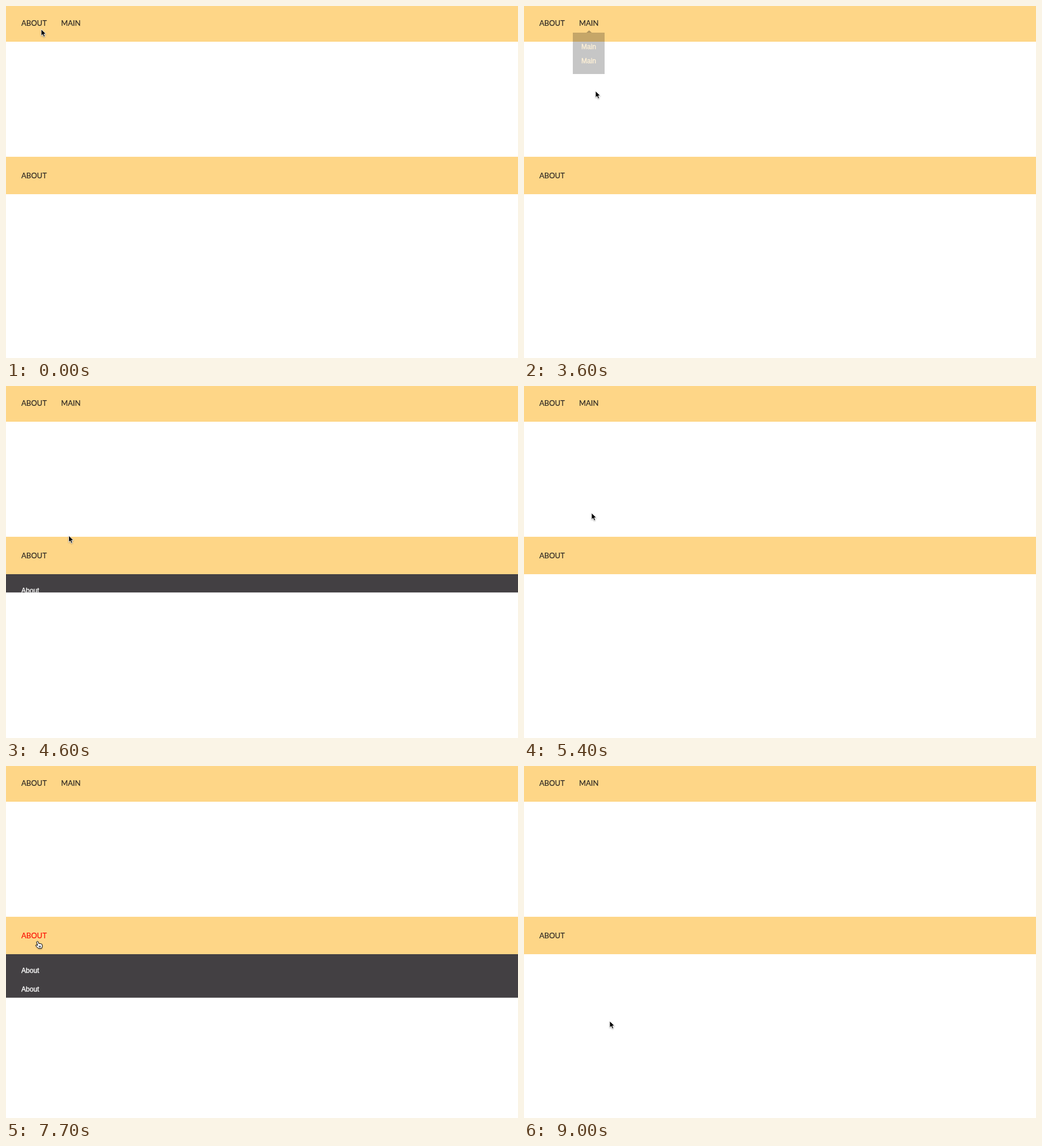
An HTML page for the animation above (9.1 s loop, 902 by 621 pixels).

```html
<!DOCTYPE html>
<html lang="en">
<head>
<meta charset="utf-8">
<title>Menu hover</title>
<style>
  html, body { margin: 0; width: 100%; height: 100%; overflow: hidden; background: #fff; }
  svg { display: block; width: 902px; height: 621px; }
  .link { font: 13px Lato, sans-serif; fill: #2b2723; stroke: #2b2723; stroke-width: .15px; }
  .link.on { fill: #fb1005; stroke: #fb1005; }
  .item { font: 12px "Liberation Sans", Arial, sans-serif; stroke-width: .35px; }
  .drop .item { fill: #fed687; stroke: #fed687; }
  .panel .item { fill: #fff; stroke: #fff; }
  #cursor { filter: drop-shadow(0 1px 1px rgba(0, 0, 0, .3)); }
</style>
</head>
<body>
<svg viewBox="0 0 902 621">
  <defs>
    <clipPath id="reveal"><rect id="revealBox" y="332" width="902" height="0"/></clipPath>
  </defs>
  <rect width="902" height="63" fill="#fed687"/>
  <rect y="266" width="902" height="66" fill="#fed687"/>
  <text class="link" id="about" x="27" y="35">ABOUT</text>
  <text class="link" id="main" x="97" y="35">MAIN</text>
  <text class="link" id="lower" x="27" y="304">ABOUT</text>

  <g class="drop" id="aboutDrop">
    <path d="M39 47L43.7 43L48.4 47Z" fill="#15120d"/>
    <rect x="15" y="47" width="63" height="73" fill="#000" fill-opacity=".67"/>
    <text class="item" x="30" y="75.5">About</text>
    <text class="item" x="30" y="100.5">About</text>
  </g>
  <g class="drop" id="mainDrop">
    <path d="M110 47L114.7 43L119.4 47Z" fill="#15120d"/>
    <rect x="86" y="47" width="56" height="73" fill="#000" fill-opacity=".67"/>
    <text class="item" x="101" y="75.5">Main</text>
    <text class="item" x="101" y="100.5">Main</text>
  </g>
  <g class="panel" clip-path="url(#reveal)">
    <rect y="332" width="902" height="96" fill="#434043"/>
    <text class="item" x="27" y="364.5">About</text>
    <text class="item" x="27" y="397.5">About</text>
  </g>

  <g id="cursor">
    <path id="arrow" d="M0 0V11.6L2.7 9.1L4.5 13.4L6.7 12.5L4.9 8.3H8.5Z" stroke="#fff" stroke-width=".9"/>
    <path id="hand" d="M-1.6 1.4Q-.4-.8 1 .8L2.4 4.6Q3.6 3.4 4.4 4.7Q5.7 3.8 6.4 5.1Q8 4.6 8.2 6.4L8.4 9.4L7.2 12.8H1.6L-2.8 8.2Q-3.4 6.4-1.5 6.6L.3 7.7Z M3 8V11 M5 8V11" fill="#fff" stroke="#000" stroke-width="1"/>
    <path id="beam" d="M-3-6.5Q0-6.5 0-4.5Q0-6.5 3-6.5M0-4.5V5M-3 7Q0 7 0 5Q0 7 3 7" fill="none" stroke="#8d8a8c" stroke-width="1"/>
  </g>
</svg>
<script>
const LOOP = 9100, STEP = 100;
const el = id => document.getElementById(id);
const clamp = v => Math.max(0, Math.min(1, v));
const ease = p => 1 - (1 - clamp(p)) ** 2.32;

// time, x, y, cursor shape from that time on
const path = [
  [0, 62, 41, 'arrow'], [400, 53, 27, 'arrow'], [900, 53, 27, 'arrow'],
  [1000, 57, 28, 'hand'], [1900, 57, 28, 'hand'], [2000, 58, 28, 'hand'],
  [2300, 58, 28, 'hand'], [2400, 61, 37, 'hand'], [2700, 67, 46, 'arrow'],
  [3000, 112, 34, 'hand'], [3300, 136, 42, 'arrow'], [3400, 137, 62, 'arrow'],
  [3600, 126, 150, 'arrow'], [3850, 76, 285, 'arrow'], [4000, 66, 296, 'hand'],
  [4100, 80, 296, 'arrow'], [4200, 97, 293, 'arrow'], [4400, 104, 284, 'arrow'],
  [4800, 117, 244, 'arrow'], [5000, 117, 241, 'arrow'], [5200, 118, 237, 'arrow'],
  [5400, 119, 224, 'arrow'], [5700, 90, 110, 'arrow'], [5900, 60, 34, 'hand'],
  [6100, 58, 29, 'hand'], [6400, 66, 32, 'arrow'], [6600, 112, 32, 'hand'],
  [6800, 122, 42, 'hand'], [6900, 125, 53, 'hand'], [7000, 128, 85, 'arrow'],
  [7100, 130, 135, 'arrow'], [7400, 70, 285, 'arrow'], [7600, 56, 296, 'hand'],
  [7800, 55, 322, 'arrow'], [8000, 56, 347, 'beam'], [8100, 56, 355, 'beam'],
  [8200, 58, 361, 'arrow'], [8500, 90, 402, 'arrow'], [8700, 125, 437, 'arrow'],
  [9000, 151, 450, 'arrow']
];

// start and end of each hover
const hovers = {
  about: [[1500, 2800], [5900, 6500]],
  main: [[2900, 3500], [6500, 7150]],
  lower: [[3850, 4450], [7400, 7800]]
};
const panelOpen = [[3850, 4450], [7350, 8520]];

const within = (spans, t) => spans.some(([a, b]) => t >= a && t < b);
const fade = (spans, t) => Math.max(...spans.map(([a, b]) =>
  Math.min(clamp((t - a + STEP) / 300), clamp(1 - (t - b + STEP) / 300))));
const slide = (spans, t) => Math.max(...spans.map(([a, b]) =>
  t < b ? ease((t - a) / 700) : 1 - ease((t - b) / 400)));

function cursorAt(t) {
  const i = path.findLastIndex(p => p[0] <= t);
  const [t0, x0, y0, shape] = path[i];
  const [t1, x1, y1] = path[i + 1] || [LOOP, x0, y0];
  const p = (t - t0) / (t1 - t0);
  return { x: x0 + (x1 - x0) * p, y: y0 + (y1 - y0) * p, shape };
}

function draw(t) {
  for (const id in hovers) el(id).classList.toggle('on', within(hovers[id], t));
  for (const id of ['about', 'main']) el(id + 'Drop').setAttribute('opacity', fade(hovers[id], t));
  el('revealBox').setAttribute('height', 96 * slide(panelOpen, t));
  const { x, y, shape } = cursorAt(t);
  el('cursor').setAttribute('transform', `translate(${x} ${y})`);
  for (const id of ['arrow', 'hand', 'beam']) el(id).style.display = id === shape ? '' : 'none';
}

const start = performance.now();
function tick() {
  const t = (performance.now() - start) % LOOP;
  draw(Math.floor(t / STEP) * STEP);
  requestAnimationFrame(tick);
}
tick();
</script>
</body>
</html>
```
